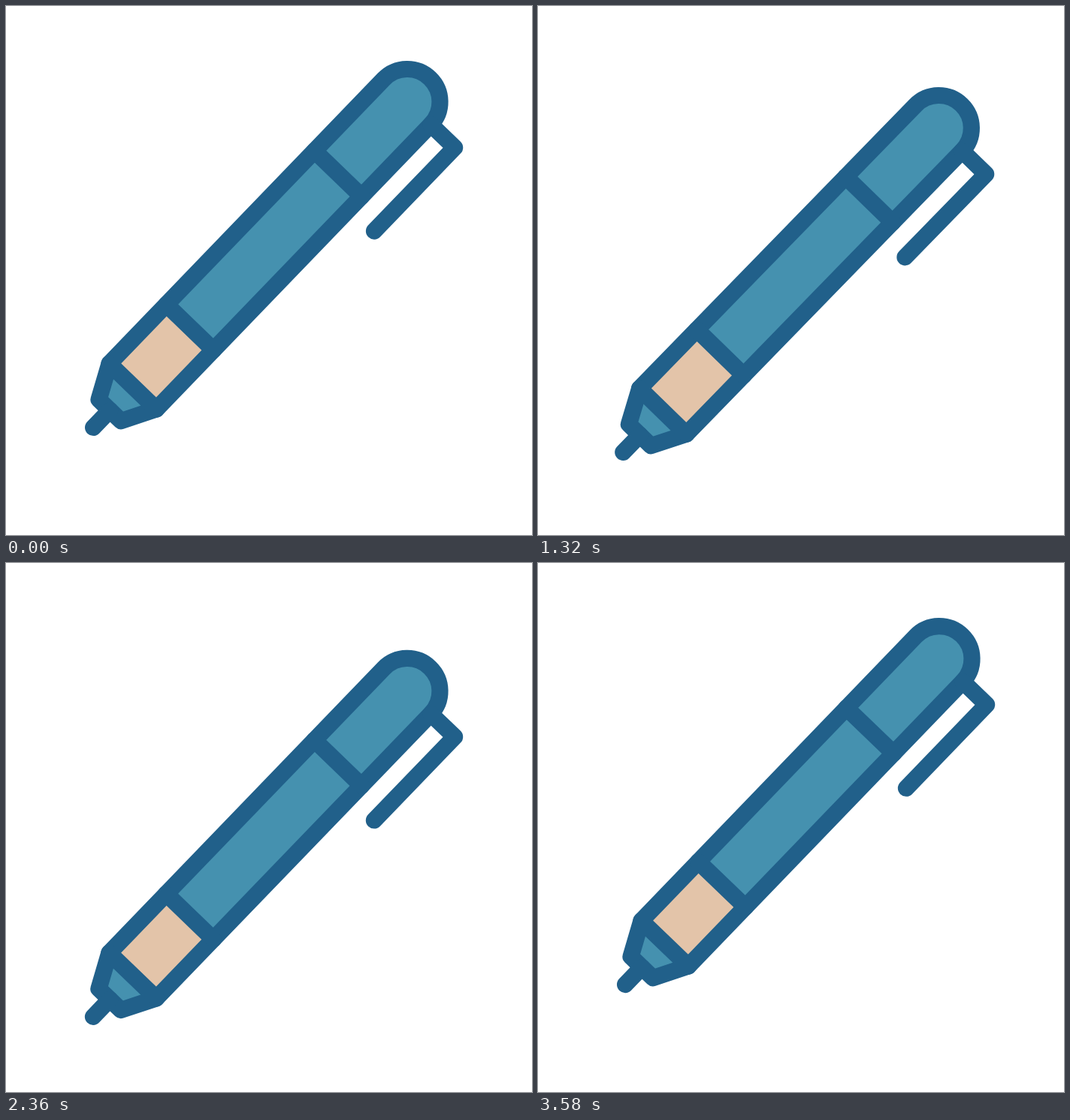
Recreate the animation shown at these times as an HTML page with a canvas. Size 700 by 704 pixels, loop 3600 ms.

```html
<!DOCTYPE html>
<html lang="en">
<head>
<meta charset="utf-8">
<title>Floating pen</title>
<style>
  html, body { margin: 0; width: 100%; height: 100%; overflow: hidden; background: #fff; }
  canvas { display: block; }
</style>
</head>
<body>
<canvas id="stage" width="700" height="704"></canvas>
<script>
const ctx = document.getElementById('stage').getContext('2d');

const LOOP = 3600;
const STEP = 20;
const INK = '#21608a';
const TEAL = '#4591af';
const SAND = '#e3c4a9';

const TILT = 2.05 * Math.PI / 180;
const DROP = 60.5;

// Pen axis: x runs from the cap centre to the tip, y points to the clip side.
const CAP = { x: 534, y: 127.5 };
const AXIS = { x: -0.6942, y: 0.7201 };
const HALF = 43.5;
const RINGS = [132.7, 416.7, 526];
const NOSE = { x: 570, half: 20.5 };

// Eased swing 0 -> 1 -> 0 that reaches 1 at `peak`.
function swing(time, period, peak) {
  const t = time % period;
  const p = t < peak ? t / peak : (period - t) / (period - peak);
  return (1 - Math.cos(Math.PI * p)) / 2;
}

function polyline(...points) {
  ctx.beginPath();
  points.forEach(([x, y]) => ctx.lineTo(x, y));
  ctx.stroke();
}

function drawPen() {
  const [, sandRing, noseRing] = RINGS;

  ctx.beginPath();
  ctx.arc(0, 0, HALF, Math.PI / 2, Math.PI * 1.5);
  ctx.lineTo(noseRing, -HALF);
  ctx.lineTo(NOSE.x, -NOSE.half);
  ctx.lineTo(NOSE.x, NOSE.half);
  ctx.lineTo(noseRing, HALF);
  ctx.closePath();
  ctx.fillStyle = TEAL;
  ctx.fill();

  ctx.fillStyle = SAND;
  ctx.fillRect(sandRing, -HALF, noseRing - sandRing, HALF * 2);

  ctx.strokeStyle = INK;
  ctx.lineWidth = 22.2;
  ctx.lineCap = ctx.lineJoin = 'round';
  ctx.stroke();

  RINGS.forEach(x => polyline([x, -HALF], [x, HALF]));
  polyline([NOSE.x, 0], [602, 0]);
  polyline([0, HALF], [0, 87.7], [154.4, 87.7]);
}

function frame(now) {
  const time = Math.floor(now % LOOP / STEP) * STEP;
  ctx.setTransform(1, 0, 0, 1, 0, 0);
  ctx.fillStyle = '#fff';
  ctx.fillRect(0, 0, 700, 704);
  ctx.translate(0, DROP * swing(time, 1800, 880));
  ctx.rotate(TILT * swing(time, 1200, 490));
  ctx.transform(AXIS.x, AXIS.y, AXIS.y, -AXIS.x, CAP.x, CAP.y);
  drawPen();
  requestAnimationFrame(frame);
}

frame(0);
</script>
</body>
</html>
```
